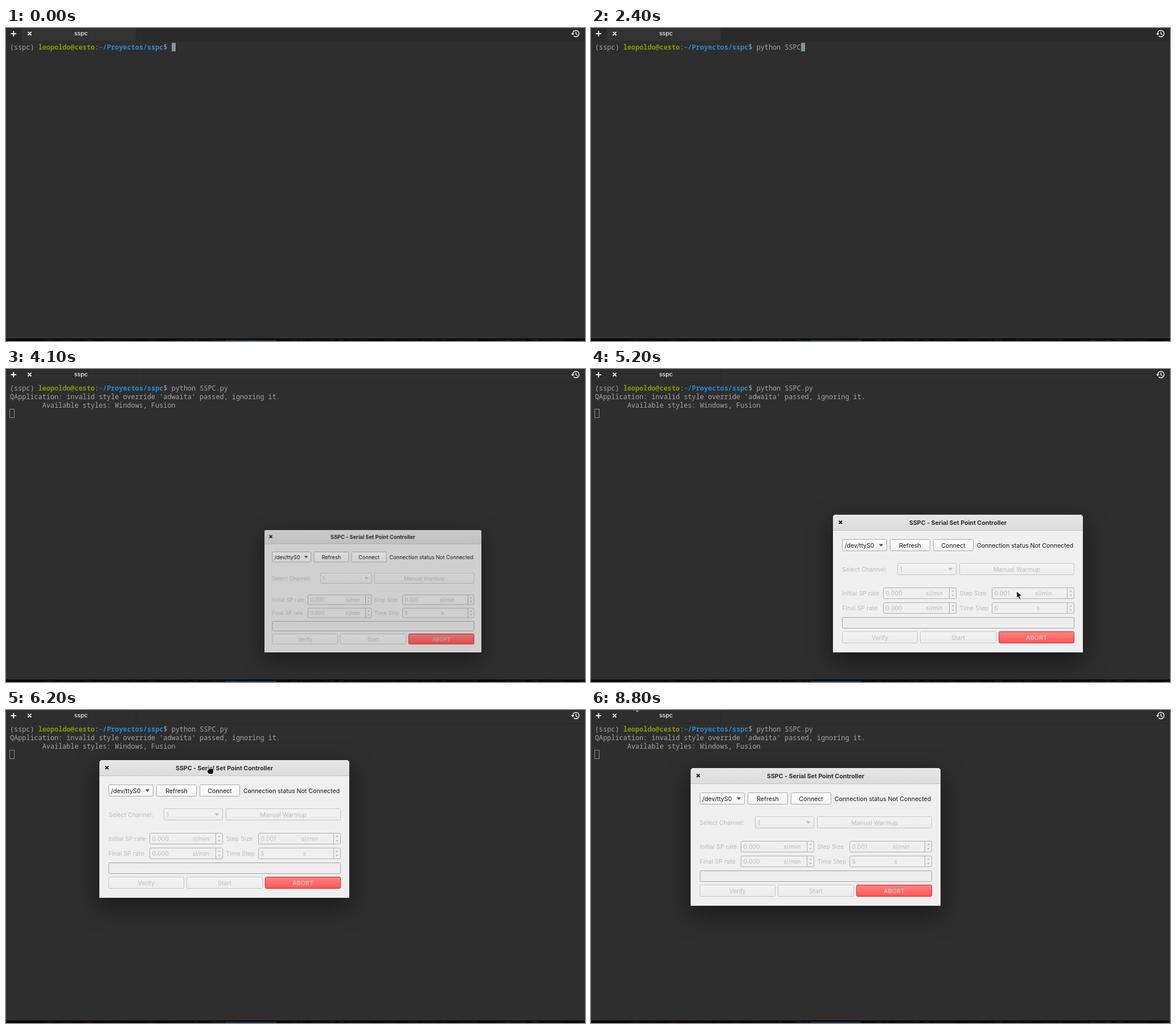
Animation of 1017x550 px, one loop 9000 ms. Source, as an HTML page with a canvas:

```html
<!DOCTYPE html>
<html lang="en">
<head>
<meta charset="utf-8">
<title>Terminal session</title>
<style>
html, body { margin: 0; width: 100%; height: 100%; overflow: hidden; background: #2e2e2e; }
canvas { display: block; }
</style>
</head>
<body>
<canvas id="stage" width="1017" height="550"></canvas>
<script>
const W = 1017, H = 550, LOOP = 9000, STEP = 100;
const ctx = document.getElementById('stage').getContext('2d');

const MONO = '11.82px "Roboto Mono", "Noto Sans Mono", monospace';
const UI = '10.6px Inter, sans-serif';
const CELL = 7.092, LEFT = 7, ROW = 15;
const WIN_W = 439, WIN_H = 242;

const PROMPT = [
  ['(sspc) ', '#a5a5a5', ''],
  ['leopoldo@cesto', '#859900', 'bold '],
  [':', '#a5a5a5', ''],
  ['~/Proyectos/sspc', '#268bd2', 'bold '],
  ['$ ', '#a5a5a5', '']
];
const COMMAND = 'python SSPC.py';
const KEY_TIMES = [300, 500, 800, 900, 1000, 1100, 1400, 1600, 1700, 2000, 2400, 2800, 3200, 3400];
const OUTPUT = [
  "QApplication: invalid style override 'adwaita' passed, ignoring it.",
  '        Available styles: Windows, Fusion'
];

// time, x scale, y scale, opacity
const OPENING = [[3900, 0.1, 0.15, 0], [4000, 0.432, 0.482, 0.4], [4100, 0.87, 0.89, 0.85], [4200, 1, 1, 1]];
// time, x, y
const WINDOW_PATH = [
  [5600, 425, 256], [5700, 372, 222], [5800, 258, 131], [5900, 150, 58],
  [6000, 150, 58], [6100, 149, 35], [6200, 164, 88], [6400, 175, 102]
];
const POINTER_PATH = [
  [5200, 747, 390], [5300, 715, 362], [5400, 650, 297], [5500, 617, 271], [5600, 617, 271],
  [5700, 560, 232], [5800, 417, 126], [5900, 342, 73], [6000, 342, 73], [6100, 341, 50],
  [6200, 356, 103], [6400, 367, 117], [6500, 367, 117], [6800, 270, 130], [7000, 187, 144],
  [7200, 262, 159], [7300, 262, 159], [7400, 268, 173], [7700, 180, 150], [8000, 34, 70],
  [8300, 72, -14], [8500, 72, -14], [8800, 75, -12]
];

function along(keys, t) {
  if (t <= keys[0][0]) return keys[0].slice(1);
  for (let i = 1; i < keys.length; i++) {
    const a = keys[i - 1], b = keys[i];
    if (t <= b[0]) {
      const k = (t - a[0]) / (b[0] - a[0]);
      return a.slice(1).map((v, j) => v + (b[j + 1] - v) * k);
    }
  }
  return keys[keys.length - 1].slice(1);
}

function write(c, text, x, y, color, font = UI, align = 'left') {
  c.font = font;
  c.fillStyle = color;
  c.textAlign = align;
  c.fillText(text, x, y);
}

function lines(c, points, color, width) {
  c.strokeStyle = color;
  c.lineWidth = width;
  c.beginPath();
  for (const [x1, y1, x2, y2] of points) {
    c.moveTo(x1, y1);
    c.lineTo(x2, y2);
  }
  c.stroke();
}

function cross(c, x, y, r, color) {
  lines(c, [[x - r, y - r, x + r, y + r], [x + r, y - r, x - r, y + r]], color, 2);
}

function polygon(c, points) {
  c.beginPath();
  points.forEach(([x, y]) => c.lineTo(x, y));
  c.closePath();
}

function makeLayer(w, h, paint) {
  const layer = document.createElement('canvas');
  layer.width = w;
  layer.height = h;
  paint(layer.getContext('2d'));
  return layer;
}

// ---- application window ----
const DARK = '#161616', DIM = '#bcbcbc';

function box(c, x, y, w, h, top, bottom, border) {
  const g = c.createLinearGradient(0, y, 0, y + h);
  g.addColorStop(0, top);
  g.addColorStop(1, bottom);
  c.fillStyle = g;
  c.strokeStyle = border;
  c.lineWidth = 1;
  c.beginPath();
  c.roundRect(x, y, w, h, 2);
  c.fill();
  c.stroke();
}

function button(c, x, y, w, label, on) {
  if (on) box(c, x, y, w, 20, '#ffffff', '#f3f3f3', '#a9a9a9');
  else box(c, x, y, w, 20, '#f3f3f3', '#ececec', '#c4c4c4');
  if (label) write(c, label, x + w / 2, y + 14, on ? DARK : DIM, UI, 'center');
}

function triangle(c, x, y, r, h, color) {
  c.fillStyle = color;
  polygon(c, [[x - r, y], [x + r, y], [x, y + h]]);
  c.fill();
}

function combo(c, x, y, w, label, on) {
  button(c, x, y, w, '', on);
  write(c, label, x + 4, y + 14, on ? DARK : DIM);
  triangle(c, x + w - 10, y + 8, 4, 4.5, on ? '#555' : '#bdbdbd');
}

function spin(c, x, y, w, value, unit, unitX) {
  box(c, x, y, w, 19, '#efefef', '#efefef', '#b0b0b0');
  write(c, value, x + 4, y + 13.7, DIM);
  write(c, unit, unitX, y + 13.7, DIM);
  lines(c, [[x + w - 12, y, x + w - 12, y + 19]], '#b0b0b0', 1);
  triangle(c, x + w - 6, y + 7, 2.5, -3, '#bdbdbd');
  triangle(c, x + w - 6, y + 12, 2.5, 3, '#bdbdbd');
}

const appWindow = makeLayer(WIN_W, WIN_H, c => {
  c.beginPath();
  c.roundRect(0, 0, WIN_W, WIN_H, [5, 5, 0, 0]);
  c.clip();
  c.fillStyle = '#efefef';
  c.fillRect(0, 0, WIN_W, WIN_H);
  const bar = c.createLinearGradient(0, 0, 0, 27);
  bar.addColorStop(0, '#e6e6e6');
  bar.addColorStop(1, '#dcdcdc');
  c.fillStyle = bar;
  c.fillRect(0, 0, WIN_W, 27);
  c.fillStyle = '#c3c3c3';
  c.fillRect(0, 27, WIN_W, 1);

  cross(c, 13.3, 13.3, 2.7, DARK);
  write(c, 'SSPC - Serial Set Point Controller', 219.5, 17.6, '#2b2b2b', 'bold ' + UI, 'center');

  combo(c, 16.5, 43.5, 78, '/dev/ttyS0', true);
  button(c, 100.5, 43.5, 70, 'Refresh', true);
  button(c, 176.5, 43.5, 70, 'Connect', true);
  write(c, 'Connection status Not Connected', 252.7, 57.5, DARK);

  write(c, 'Select Channel:', 16, 99.5, DIM);
  combo(c, 113.5, 85.5, 103, '1', false);
  button(c, 222.5, 85.5, 201, 'Manual Warmup', false);

  write(c, 'Initial SP rate', 16, 142, DIM);
  spin(c, 88.5, 128.5, 128, '0.000', 'sl/min', 163.3);
  write(c, 'Step Size', 222.5, 142, DIM);
  spin(c, 279.5, 128.5, 144, '0.001', 'sl/min', 354.8);

  write(c, 'Final SP rate', 16, 168.4, DIM);
  spin(c, 88.5, 154.5, 128, '0.000', 'sl/min', 163.3);
  write(c, 'Time Step', 222.5, 168.4, DIM);
  spin(c, 279.5, 154.5, 144, '5', 's', 357.5);

  box(c, 16.5, 180.5, 407, 19, '#ebebeb', '#efefef', '#a3a3a3');

  button(c, 16.5, 205.5, 132, 'Verify', false);
  button(c, 153.5, 205.5, 133, 'Start', false);
  box(c, 291.5, 205.5, 132, 20, '#ff8383', '#ff5656', '#dd1f1f');
  write(c, 'ABORT', 357.5, 219.5, '#d3b5b5', 'bold ' + UI, 'center');
});

// ---- sliver of desktop under the terminal ----
const desktop = makeLayer(W, 5, c => {
  let seed = 11;
  const rnd = () => (seed = seed * 16807 % 2147483647) / 2147483647;
  c.fillStyle = '#08070b';
  c.fillRect(0, 0, W, 5);
  for (let i = 0; i < 150; i++) {
    const x = rnd() * W;
    c.fillStyle = rnd() < 0.6 ? 'rgba(70,20,36,.35)' : 'rgba(24,70,78,.35)';
    c.fillRect(x, 1 + rnd() * 3, 3 + rnd() * 14, 1);
  }
  c.fillStyle = 'rgba(30,92,100,.5)';
  c.fillRect(385, 2, 90, 3);
});

// ---- terminal ----
function drawHeader(active) {
  ctx.fillStyle = active ? '#2a2a2a' : '#2e2e2e';
  ctx.fillRect(0, 0, W, 24);
  if (active) {
    ctx.fillStyle = '#333333';
    ctx.fillRect(28, 0, 201, 23);
  }
  ctx.fillStyle = '#272727';
  ctx.fillRect(228, 0, 1, 23);
  ctx.fillRect(0, 23, W, 1);

  const ink = '#f4f4f4';
  lines(ctx, [[8.5, 10, 18, 10], [13.25, 5.2, 13.25, 14.8]], ink, 2);
  cross(ctx, 41.5, 9.8, 2.9, ink);
  write(ctx, 'sspc', 131.7, 13.4, '#eeeeee', '500 ' + UI, 'center');

  ctx.strokeStyle = ink;
  ctx.lineWidth = 1.5;
  ctx.beginPath();
  ctx.arc(1001, 9.8, 5.6, Math.PI, Math.PI * 2.75);
  ctx.stroke();
  triangle(ctx, 995.4, 9.3, 2.8, 3.4, ink);
  lines(ctx, [[1001, 6.4, 1001, 10.3], [1000.6, 10, 1003.6, 11.9]], ink, 1.4);
}

function drawTerminal(t) {
  ctx.fillStyle = '#2e2e2e';
  ctx.fillRect(0, 0, W, H);
  drawHeader(t < 4100);

  let col = 0;
  for (const [text, color, weight] of PROMPT) {
    write(ctx, text, LEFT + col * CELL, 37.5, color, weight + MONO);
    col += text.length;
  }
  const typed = KEY_TIMES.filter(k => k <= t).length;
  write(ctx, COMMAND.slice(0, typed), LEFT + col * CELL, 37.5, '#a5a5a5', MONO);

  const entered = t >= 3800, printed = t >= 3900;
  if (printed) OUTPUT.forEach((s, i) => write(ctx, s, LEFT, 37.5 + ROW * (i + 1), '#a5a5a5', MONO));

  const row = printed ? 3 : entered ? 1 : 0;
  const x = Math.round(LEFT + (entered ? 0 : col + typed) * CELL);
  const y = 26 + row * ROW;
  if (t >= 4000) {
    ctx.strokeStyle = '#839496';
    ctx.lineWidth = 1;
    ctx.strokeRect(x - 0.5, y - 0.5, 8, 15);
  } else {
    ctx.fillStyle = '#839496';
    ctx.fillRect(x, y, 7, 15);
  }

  ctx.fillStyle = '#1d1d1d';
  ctx.fillRect(0, 545, W, 1);
  ctx.drawImage(desktop, 0, 546);
}

function drawWindow(t) {
  const [sx, sy, alpha] = along(OPENING, t);
  if (alpha === 0) return;
  const [x, y] = along(WINDOW_PATH, t);
  const w = WIN_W * sx, h = WIN_H * sy;
  ctx.save();
  ctx.globalAlpha = alpha;
  ctx.shadowColor = 'rgba(0,0,0,.5)';
  ctx.shadowBlur = 42 * sx;
  ctx.shadowOffsetY = 14 * sy;
  ctx.imageSmoothingQuality = 'high';
  ctx.drawImage(appWindow, x + (WIN_W - w) / 2, y + WIN_H - h, w, h);
  ctx.restore();
}

// ---- pointer ----
function drawArrow() {
  polygon(ctx, [[0.5, 0.5], [0.5, 12.3], [3.3, 9.9], [5.6, 14.9], [7.9, 13.9], [5.7, 9.1], [9.8, 8.8]]);
  ctx.fill();
  ctx.stroke();
}

function drawFist() {
  ctx.beginPath();
  ctx.moveTo(-2.5, 5.5);
  ctx.quadraticCurveTo(-6, 2.5, -5.5, -0.5);
  ctx.quadraticCurveTo(-4.8, -1.6, -3.8, -1);
  for (let i = 0; i < 4; i++) {
    const k = -3.8 + i * 2.3;
    ctx.quadraticCurveTo(k + 0.1, i === 3 ? -4 : -5.4, k + 1.15, i === 3 ? -4 : -5.4);
    ctx.quadraticCurveTo(k + 2.3, -5, k + 2.3, -3.2);
  }
  ctx.quadraticCurveTo(6.2, 2.5, 4, 5.5);
  ctx.closePath();
  ctx.fill();
  ctx.stroke();
}

function drawPointer(t) {
  if (t < 5200) return;
  const [x, y] = along(POINTER_PATH, t).map(Math.round);
  const holding = t >= 5700 && t < 6500;
  ctx.save();
  ctx.translate(x, y);
  ctx.fillStyle = '#000';
  ctx.strokeStyle = '#fff';
  ctx.lineWidth = 1;
  ctx.lineJoin = 'round';
  if (holding) {
    ctx.translate(3, 4);
    drawFist();
  } else {
    drawArrow();
  }
  ctx.restore();
}

const start = performance.now();

function frame(now) {
  const elapsed = Math.max(0, now - start) % LOOP;
  const t = Math.floor(elapsed / STEP) * STEP;
  drawTerminal(t);
  drawWindow(t);
  drawPointer(t);
  requestAnimationFrame(frame);
}
frame(start);
</script>
</body>
</html>
```
